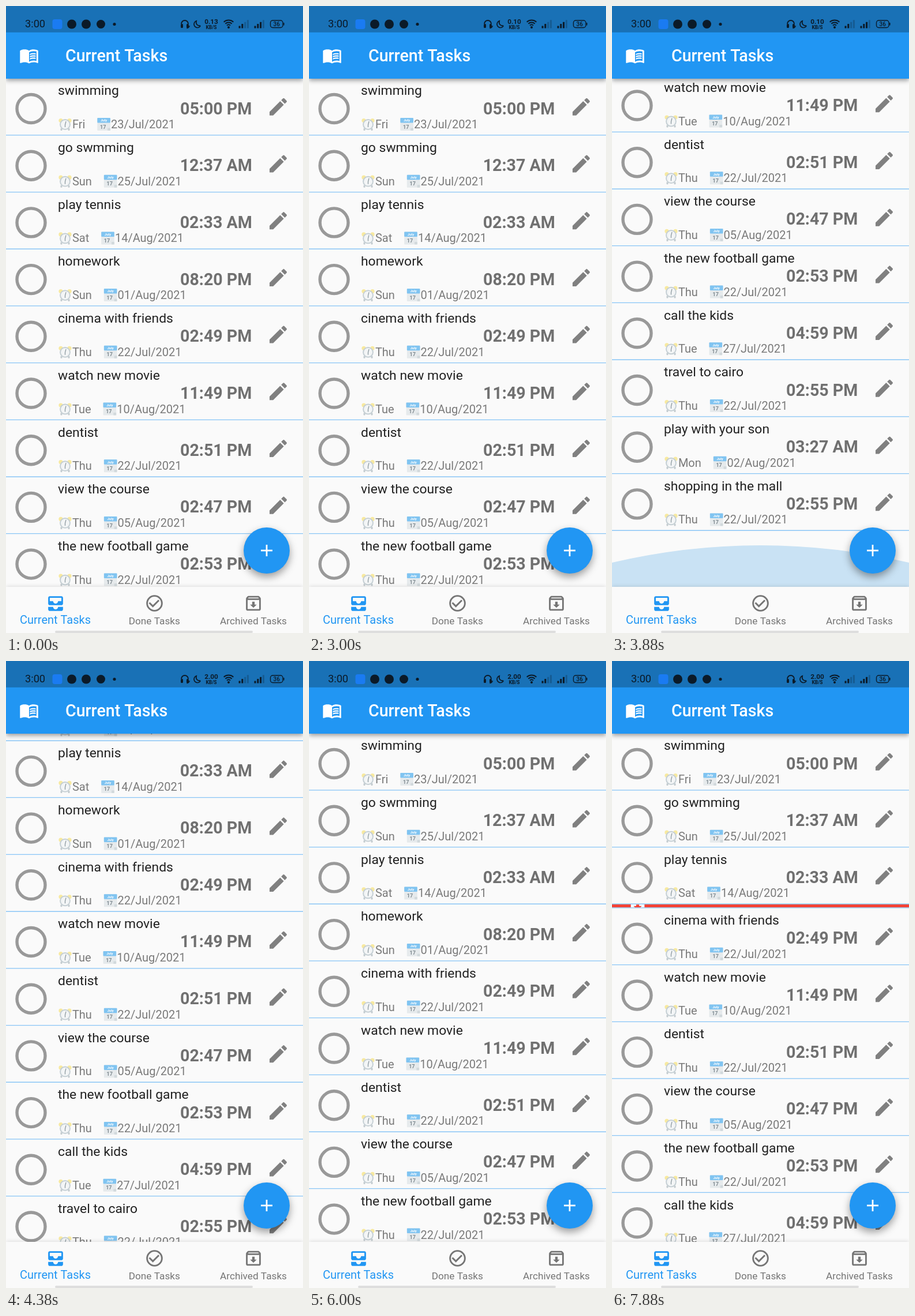
An HTML page with a canvas for the animation above (8 s loop, 515 by 1087 pixels).

```html
<!DOCTYPE html>
<html lang="en">
<head>
<meta charset="utf-8">
<title>Current Tasks</title>
<style>
  html, body { margin: 0; width: 100%; height: 100%; overflow: hidden; background: #fafafa; }
  canvas { display: block; width: 515px; height: 1087px; }
</style>
</head>
<body>
<canvas id="stage" width="515" height="1087"></canvas>
<script>
const ctx = document.getElementById('stage').getContext('2d');
const W = 515, H = 1087, LOOP = 8000, STEP = 125;
const LIST_TOP = 126, NAV_TOP = 1007, ROW = 97.4, GAP = 1.3, MAX_SCROLL = 499;
const BLUE = '#2196f3', PAPER = '#fafafa', GREY = '#757575', INK = '#0b1a28';
const DISMISSED = 3;

const tasks = [
  ['swimming', '05:00 PM', 'Fri', '23/Jul/2021'],
  ['go swmming', '12:37 AM', 'Sun', '25/Jul/2021'],
  ['play tennis', '02:33 AM', 'Sat', '14/Aug/2021'],
  ['homework', '08:20 PM', 'Sun', '01/Aug/2021'],
  ['cinema with friends', '02:49 PM', 'Thu', '22/Jul/2021'],
  ['watch new movie', '11:49 PM', 'Tue', '10/Aug/2021'],
  ['dentist', '02:51 PM', 'Thu', '22/Jul/2021'],
  ['view the course', '02:47 PM', 'Thu', '05/Aug/2021'],
  ['the new football game', '02:53 PM', 'Thu', '22/Jul/2021'],
  ['call the kids', '04:59 PM', 'Tue', '27/Jul/2021'],
  ['travel to cairo', '02:55 PM', 'Thu', '22/Jul/2021'],
  ['play with your son', '03:27 AM', 'Mon', '02/Aug/2021'],
  ['shopping in the mall', '02:55 PM', 'Thu', '22/Jul/2021']
];

// Icons on a 24-unit grid
const icons = {
  edit: 'M3 17.25V21h3.75L17.81 9.94l-3.75-3.75zM20.71 7.04a1 1 0 000-1.41l-2.34-2.34a1 1 0 00-1.41 0l-1.83 1.83 3.75 3.75z',
  inbox: 'M19 3H5c-1.1 0-2 .9-2 2v7c0 1.1.9 2 2 2h14c1.1 0 2-.9 2-2V5c0-1.1-.9-2-2-2zm0 6h-4c0 1.62-1.38 3-3 3s-3-1.38-3-3H5V5h14zM15 16h6v3c0 1.1-.9 2-2 2H5c-1.1 0-2-.9-2-2v-3h6c0 1.66 1.34 3 3 3s3-1.34 3-3z',
  done: 'M16.59 7.58L10 14.17l-3.59-3.58L5 12l5 5 8-8zM12 2a10 10 0 000 20 10 10 0 000-20zm0 18a8 8 0 010-16 8 8 0 010 16z',
  archive: 'M20.54 5.23l-1.39-1.68C18.88 3.21 18.47 3 18 3H6c-.47 0-.88.21-1.16.55L3.46 5.23C3.17 5.57 3 6.02 3 6.5V19c0 1.1.9 2 2 2h14c1.1 0 2-.9 2-2V6.5c0-.48-.17-.93-.46-1.27zM6.24 5h11.52l.83 1H5.42zM5 19V8h14v11zm11-5.5l-4 4-4-4h2.5V10h3v3.5z',
  archiveSolid: 'M20.54 5.23l-1.39-1.68C18.88 3.21 18.47 3 18 3H6c-.47 0-.88.21-1.16.55L3.46 5.23C3.17 5.57 3 6.02 3 6.5V19c0 1.1.9 2 2 2h14c1.1 0 2-.9 2-2V6.5c0-.48-.17-.93-.46-1.27zM12 17.5L6.5 12H10v-2h4v2h3.5zM5.12 5l.81-1h12l.94 1z',
  book: 'M21 5c-1.11-.35-2.33-.5-3.5-.5-1.95 0-4.05.4-5.5 1.5-1.45-1.1-3.55-1.5-5.5-1.5S2.45 4.9 1 6v14.65c0 .25.25.5.5.5C3.1 20.45 5.05 20 6.5 20c1.95 0 4.05.4 5.5 1.5 1.35-.85 3.8-1.5 5.5-1.5 1.65 0 3.35.3 4.75 1.05.5.1.75-.1.75-.45V6c-.6-.45-1.25-.75-2-1zm0 13.5c-1.1-.35-2.3-.5-3.5-.5-1.7 0-4.15.65-5.5 1.5V8c1.35-.85 3.8-1.5 5.5-1.5 1.2 0 2.4.15 3.5.5z',
  bookLine: 'M17.5 10.5c.88 0 1.73.09 2.5.26V9.24c-.79-.15-1.64-.24-2.5-.24-1.7 0-3.24.29-4.5.83v1.66c1.13-.64 2.7-.99 4.5-.99z'
};
for (const name in icons) icons[name] = new Path2D(icons[name]);

const progress = (t, from, to) => Math.min(1, Math.max(0, (t - from) / (to - from)));
const easeOut = (u, power) => 1 - (1 - u) ** power;

function rect(x, y, w, h, color, radius = 0) {
  ctx.fillStyle = color;
  ctx.beginPath();
  ctx.roundRect(x, y, w, h, radius);
  ctx.fill();
}

function disc(x, y, r, color) {
  ctx.fillStyle = color;
  ctx.beginPath();
  ctx.arc(x, y, r, 0, 2 * Math.PI);
  ctx.fill();
}

function arc(x, y, r, color, width, from = 0, to = 2 * Math.PI) {
  ctx.strokeStyle = color;
  ctx.lineWidth = width;
  ctx.beginPath();
  ctx.arc(x, y, r, from, to);
  ctx.stroke();
}

function text(str, x, y, size, color, weight = 400, align = 'left') {
  ctx.font = `${weight} ${size}px Roboto, sans-serif`;
  ctx.fillStyle = color;
  ctx.textAlign = align;
  ctx.fillText(str, x, y);
  return ctx.measureText(str).width;
}

function icon(name, cx, cy, size, color, dy = 0) {
  ctx.save();
  ctx.translate(cx, cy);
  ctx.scale(size / 24, size / 24);
  ctx.translate(-12, dy - 12);
  ctx.fillStyle = color;
  ctx.fill(icons[name], 'evenodd');
  ctx.restore();
}

function clipped(x, y, w, h, draw) {
  ctx.save();
  ctx.beginPath();
  ctx.rect(x, y, w, h);
  ctx.clip();
  draw();
  ctx.restore();
}

function shadowed(blur, offset, alpha, draw) {
  ctx.save();
  ctx.shadowColor = `rgba(0,0,0,${alpha})`;
  ctx.shadowBlur = blur;
  ctx.shadowOffsetY = offset;
  draw();
  ctx.restore();
}

function alarmClock(x, y) {
  disc(x + 4.5, y + 4.5, 3.6, '#f7e9a0');
  disc(x + 19.5, y + 4.5, 3.6, '#f7e9a0');
  rect(x + 4, y + 18, 3, 4, '#c3cbcf', 1);
  rect(x + 17, y + 18, 3, 4, '#c3cbcf', 1);
  disc(x + 12, y + 11.5, 9.4, '#c5cfd4');
  disc(x + 12, y + 11.5, 7.4, '#f3f5f6');
  ctx.strokeStyle = '#8e9aa0';
  ctx.lineWidth = 1.3;
  ctx.beginPath();
  ctx.moveTo(x + 13.5, y + 6);
  ctx.lineTo(x + 12, y + 12);
  ctx.lineTo(x + 12, y + 16);
  ctx.stroke();
}

function calendar(x, y) {
  rect(x + 1.2, y, 22.6, 22, '#e6eaec', 1);
  rect(x + 1.2, y, 22.6, 8.5, '#80c4f1', 1);
  text('July', x + 12.5, y + 6.3, 6, '#fff', 700, 'center');
  text('17', x + 11, y + 18.6, 9, '#7d888e', 700, 'center');
  rect(x + 19, y + 17.5, 4.8, 4.5, '#d2d9dc');
}

function taskRow([title, time, day, date], y) {
  rect(0, y, W, ROW, PAPER);
  arc(43.5, y + 52, 24.5, '#999', 5.4);
  text(title, 90, y + 28.3, 22.9, '#212121');
  alarmClock(90.5, y + 68);
  const dayEnd = 114.9 + text(day, 114.9, y + 86, 20, '#7a7a7a');
  const calendarX = dayEnd + 19.8;
  calendar(calendarX, y + 68);
  text(date, calendarX + 24.9, y + 86, 20, '#7a7a7a');
  text(time, 364.2, y + 61.5, 28.6, '#707070', 700, 'center');
  icon('edit', 472, y + 48.8, 40, '#808080');
}

function dismissedRow(task, y, height, slide) {
  clipped(0, y, W, height, () => {
    rect(0, y, W, height, '#f44336');
    icon('archiveSolid', 44.5, y + height / 2, 31.5, '#fff');
    ctx.translate(slide * W, 0);
    if (slide < 1) taskRow(task, y);
  });
}

function list(t) {
  const scroll = MAX_SCROLL * (easeOut(progress(t, 3200, 3860), 3) - easeOut(progress(t, 4200, 4820), 3));
  const slide = progress(t, 7200, 7590) ** 1.6;
  const height = ROW * (1 - easeOut(progress(t, 7746, 7926), 2.3));
  rect(0, LIST_TOP, W, NAV_TOP - LIST_TOP, PAPER);
  ctx.fillStyle = '#c9e2f4';
  ctx.beginPath();
  ctx.moveTo(0, 965);
  ctx.quadraticCurveTo(W / 2, 905, W, 965);
  ctx.lineTo(W, NAV_TOP);
  ctx.lineTo(0, NAV_TOP);
  ctx.fill();

  let y = LIST_TOP - scroll;
  tasks.forEach((task, i) => {
    const swiping = i === DISMISSED && slide > 0;
    const rowHeight = swiping ? height : ROW;
    if (swiping) dismissedRow(task, y, rowHeight, slide);
    else if (y > LIST_TOP - ROW && y < NAV_TOP) taskRow(task, y);
    rect(0, y + rowHeight - 0.2, W, GAP + 0.2, '#8ac6f6');
    y += rowHeight + GAP;
  });
}

function signal(x, active) {
  for (let i = 0; i < 4; i++) {
    const h = 4 + i * 3.4;
    rect(x + i * 4.8, 38.5 - h, 3, h, i < active ? INK : 'rgba(11,26,40,.25)', 0.5);
  }
}

function statusBar(t) {
  rect(0, 0, W, 45.7, '#1971b6');
  text('3:00', 33, 37.3, 18.2, INK);
  rect(80.5, 23, 17, 17, '#1a7bf2', 4);
  disc(114, 31.5, 8, INK);
  disc(139, 31.5, 8, INK);
  disc(164.5, 31.5, 7.5, INK);
  disc(188, 31.5, 2.6, INK);

  arc(310, 31, 6, INK, 1.8, Math.PI, 0);
  rect(303, 31, 4, 7, INK, 1.5);
  rect(313, 31, 4, 7, INK, 1.5);
  arc(313, 33, 5.5, INK, 1.4, 0.2, 1.5);

  ctx.strokeStyle = INK;
  ctx.lineWidth = 1.7;
  ctx.beginPath();
  ctx.arc(332, 31.5, 6, 0.5, 4.4);
  ctx.quadraticCurveTo(328, 34, 337.2, 34.4);
  ctx.stroke();

  const speed = t < 625 ? '0.13' : t < 4250 ? '0.10' : '2.00';
  text(speed, 356, 31, 11.8, INK, 700, 'center');
  text('KB/S', 356, 40, 8.4, INK, 700, 'center');

  for (const r of [4.5, 8.5, 12.5]) arc(386, 37, r, INK, 2, -2.3, -0.84);
  disc(386, 37, 2, INK);
  signal(403.5, 2);
  signal(430.5, 3);

  ctx.strokeStyle = INK;
  ctx.lineWidth = 1.4;
  ctx.beginPath();
  ctx.roundRect(458.5, 25, 21.5, 12.5, 4);
  ctx.stroke();
  rect(481, 29, 1.5, 4.5, INK);
  text('36', 469.3, 35, 10, INK, 500, 'center');
}

function appBar() {
  shadowed(8, 3, 0.4, () => rect(0, 40, W, LIST_TOP - 40, BLUE));
  icon('book', 40, 86, 34.3, '#fff');
  for (let i = 0; i < 3; i++) icon('bookLine', 40, 86, 34.3, '#fff', i * 2.67);
  text('Current Tasks', 103, 96, 28.6, '#fff', 500);
}

function addButton() {
  shadowed(14, 6, 0.38, () => disc(452, 944, 40, BLUE));
  rect(442, 942.6, 20, 2.8, '#fff');
  rect(450.6, 934, 2.8, 20, '#fff');
}

function navBar() {
  shadowed(6, -1, 0.12, () => rect(0, NAV_TOP, W, H - NAV_TOP, PAPER));
  icon('inbox', 86, 1036, 34.3, BLUE);
  icon('done', 257.5, 1035.5, 34.3, GREY);
  icon('archive', 429, 1035.5, 34.3, GREY);
  text('Current Tasks', 85.5, 1071, 20, BLUE, 400, 'center');
  text('Done Tasks', 257.3, 1072, 17.2, GREY, 400, 'center');
  text('Archived Tasks', 429, 1072, 17.2, GREY, 400, 'center');
  rect(85, 1083, 343, 4, '#dedede', 2);
}

function draw(now) {
  const t = Math.floor(((now % LOOP) + 5) / STEP) * STEP % LOOP;
  ctx.clearRect(0, 0, W, H);
  list(t);
  appBar();
  statusBar(t);
  addButton();
  navBar();
}

const start = performance.now();
function frame() {
  draw(performance.now() - start);
  requestAnimationFrame(frame);
}
frame();
</script>
</body>
</html>
```
